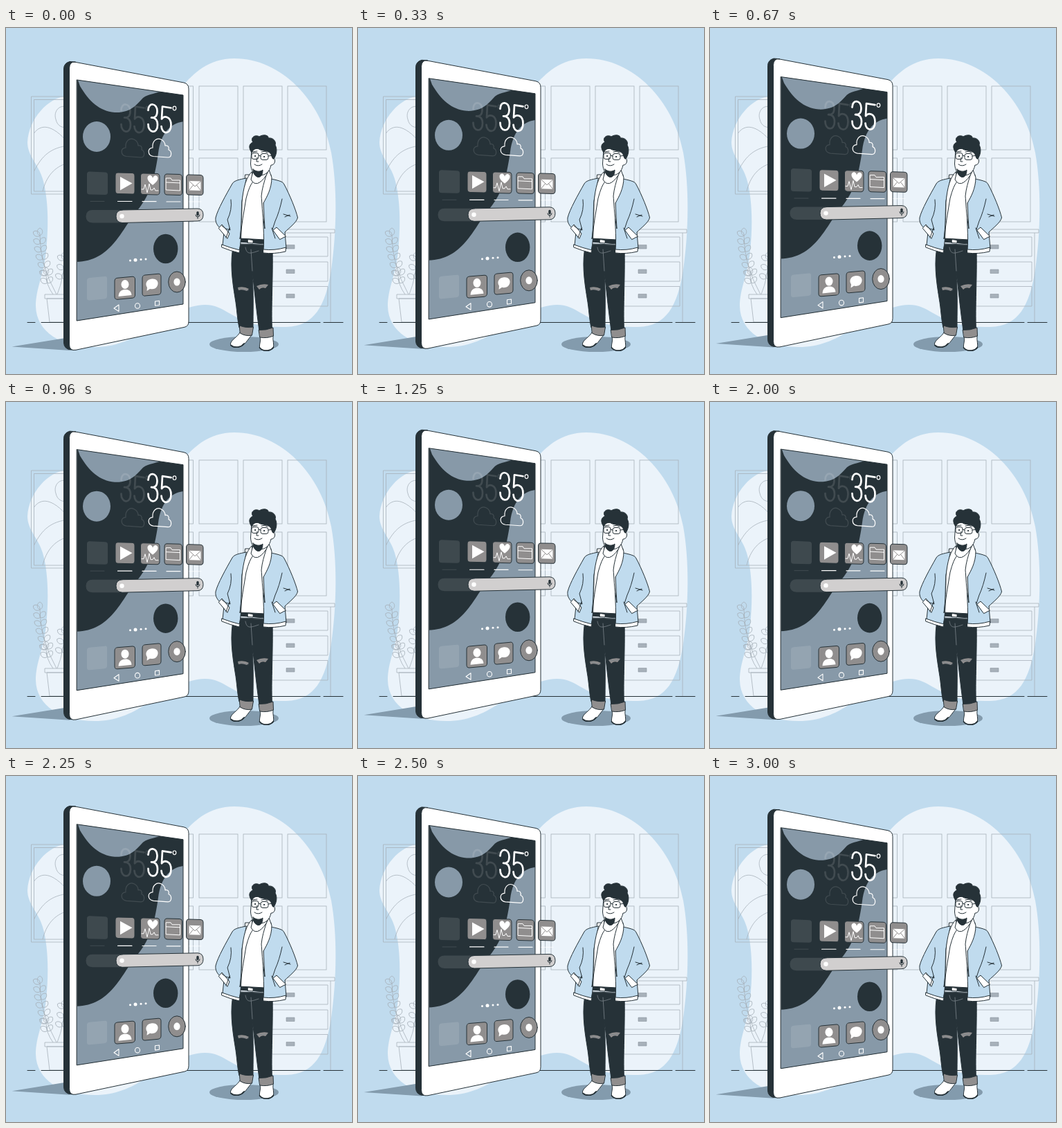
Write an HTML page that moves like this. It is 500 by 500 pixels and loops after 3.04 s.

```html
<!DOCTYPE html>
<html lang="en">
<head>
<meta charset="utf-8">
<title>Floating phone screen</title>
<style>
html, body { margin: 0; width: 100%; height: 100%; overflow: hidden; background: #c0dbee; }
svg { display: block; width: 100vw; height: 100vh; }
.ink { stroke: #263238; stroke-width: 1; stroke-linejoin: round; stroke-linecap: round; }
.pale { fill: none; stroke: #a7b1ba; stroke-width: .8; }
.line { fill: none; }
.white { fill: #fff; }
.dark { fill: #263238; }
.slate { fill: #8799a8; }
.gray { fill: #908e8e; }
.blue { fill: #c0dbee; }
.glow { fill: none; stroke: #fff; stroke-linecap: round; stroke-linejoin: round; }
</style>
</head>
<body>
<svg viewBox="0 0 500 500">
  <defs>
    <clipPath id="screen"><path d="M102.500 75L256 97V399L102.500 423Z"/></clipPath>
    <g id="weather" class="glow">
      <path stroke-width="2.700" d="M205.500 119C205.500 107 218.500 108 218.500 120C218.500 127 216 130 210 129.500C216 129.500 219 133 219 140C219 154 205 152 205.500 139M238.500 115.500L226 113.500L225 131.500C229 126 238.500 128 238.500 140C238.500 155 225 154 224.500 142"/>
      <ellipse cx="243.500" cy="116" rx="2.300" ry="2.800" stroke-width="1.200"/>
      <path stroke-width="1.200" d="M213 185.500C204 184 204 173 212 173C211 163 218 158 224 161C228 163 230 166 230 170C234 169 236 172 235 176C240 178 240 187 234 187Z"/>
    </g>
  </defs>

  <!-- room -->
  <path fill="#ebf3fa" d="M85 99C62 101 33 130 31 165C31 185 47 197 53 218C61 245 62 285 58 322C55 356 43 376 43 402C44 440 80 461 128 461C190 461 215 418 264 404C294 395 306 402 326 414C350 428 372 433 405 432C446 431 462 401 470 349C478 294 479 230 470 180C456 105 398 44 330 44C292 44 271 66 255 84C215 128 150 94 85 99Z"/>
  <g class="pale">
    <path d="M90 99H36.500V240H90M90 103.500H40.500V236H90M90 115C78 109 68 120 72 132C74 142 83 146 90 142M40.500 152C50 139 66 138 90 166M40.500 207C52 184 65 173 90 170M53 236C58 215 70 200 90 195"/>
    <g id="doors"></g>
    <path d="M350 291H475V296H350M469 296V425M372 302H465V330H372M372 338H465V366H372M372 373.500H465V402H372M375 296V425"/>
    <path fill="#ebf3fa" d="M56 385H90V391H56ZM59 391L63 425H90V391Z"/>
    <g id="plant"></g>
  </g>
  <path fill="#a7b1ba" stroke="#8c969e" stroke-width=".6" d="M405 313.500h12v5.500h-12ZM405 349h12v5.500h-12ZM405 384.500h12v5.500h-12Z"/>
  <path class="ink line" d="M31 425.500H42M51 425.500H454M459 425.500H487"/>

  <!-- phone -->
  <g id="phone">
    <path fill="#839bad" d="M8.500 460.500L92 447V466Z"/>
    <path class="ink dark" d="M100 49L92 48.500Q83.500 51 83.500 59V455Q84 463.500 93 465L101 465Z"/>
    <path class="ink white" d="M100 49.300L257 79Q264 80.500 264 88V424Q264 431 258 432.300L101 465.300Q91.500 467 91.500 457V58Q92 48 100 49.300Z"/>
    <g clip-path="url(#screen)">
      <path class="dark" d="M102 74H257V424H102Z"/>
      <path class="slate" d="M102 70L107 84C120 106 135 120 157 122C181 123 189 110 198 101C207 94 217 96 231 88V70ZM258 135C238 137 224 151 220 181C214 223 207 244 187 267C167 292 151 337 102 338V424H258Z"/>
      <ellipse class="slate" cx="131" cy="157" rx="20" ry="22"/>
      <ellipse class="dark" cx="230.700" cy="319" rx="17.700" ry="21.300"/>
    </g>
    <path class="ink line" d="M102.500 75L256 97V399L102.500 423Z"/>
    <use href="#weather" x="-39" opacity=".12"/>
    <use href="#weather"/>
    <g fill="#fff" opacity=".11">
      <path d="M121 207.500L143 208.500Q147 208.500 147 212V237.500Q147 241 143 241L121 240.500Q117 240.500 117 237V211Q117 207.500 121 207.500Z"/>
      <path d="M125 263H165V281.500H125Q115.500 281 115.500 272Q116 263 125 263Z"/>
      <path d="M121 361L143 359Q146 358.500 146 362V387.500Q146 391 142 391.500L121 393.500Q117 394 117 390V365Q117 361.500 121 361Z"/>
    </g>
    <g id="tiles"></g>

    <path class="white" d="M165 215V234.500L182.500 224.500Z"/>
    <path class="white" d="M212 227C204 221 203 216 206 213.500C209 211 212 215 212 217C213 213 217 212 219 215C221 219 217 223 212 227Z"/>
    <path class="glow" d="M196 233H199L201 226L204 238L207 225L209 234H212L214 231L216 235H220"/>
    <path class="glow" d="M231.500 217H238L240 220H251.500V235L231.500 234ZM231.500 223L251.500 224"/>
    <path class="white" d="M264.500 221L281.500 221.500V235L264.500 234.500Z"/>
    <path class="line" stroke="#908e8e" d="M264.500 221L273 229L281.500 221.500M264.500 234.500L270.500 227M281.500 235L275.500 227"/>
    <path class="glow" stroke-width="1.200" d="M161.500 250.500H182M197 250.700H217M232 251H252"/>
    <path class="glow" opacity=".7" d="M265 251H282"/>
    <path class="glow" opacity=".12" d="M122 250.500H142"/>

    <path class="ink" fill="#d1cfcf" d="M168 263L277 261Q285 261.500 285 270Q285 278.500 277 279L168 281.500Q159 281 159 272Q159 263.500 168 263Z"/>
    <circle class="white" cx="167.500" cy="272" r="3.200"/>
    <rect class="dark" x="275.300" y="265" width="3.400" height="6.500" rx="1.700"/>
    <path class="ink line" stroke-width=".8" d="M274 270Q274 273 277 273Q280 273 280 270M277 273V275.500"/>

    <g class="white">
      <circle cx="179.500" cy="336" r="1.500"/><circle cx="187" cy="335.200" r="2.500"/>
      <circle cx="195" cy="334.500" r="1.500"/><circle cx="202" cy="334" r="1.500"/>
      <ellipse cx="172" cy="370.500" rx="5.500" ry="6.500"/>
      <path d="M162.500 388C163 380 168 378 172 378C176 377.500 181 379 181.500 386Z"/>
      <path d="M203.500 380L204 375C200 369 204 363 211 362.500C218 362 221 367 219 372C217 377 212 378 208 377Z"/>
    </g>
    <ellipse class="ink gray" cx="247" cy="367" rx="12.300" ry="15"/>
    <ellipse class="white" cx="247" cy="367" rx="4.600" ry="5.500"/>
    <path class="glow" stroke-width="1.100" d="M156 405L163 400V409.500ZM215.500 395L221.500 394.200V400.500L215.500 401.300Z"/>
    <ellipse class="glow" stroke-width="1.100" cx="190" cy="401.500" rx="3.500" ry="3.800"/>
  </g>

  <!-- man -->
  <ellipse fill="#839bad" cx="344" cy="457" rx="50" ry="11"/>
  <g class="ink">
    <path class="white" d="M338 440C334 447 326 450 324.500 456C324 461 330 462 336 461C345 460 349 450 355 444ZM367 446C369 453 365 458 367 463C371 468 381 467 386 463C388 457 385 452 386 445Z"/>
    <path class="line" stroke-width="1.800" d="M325 458.500Q329 462 336 461Q341 460 344 456M366.500 462Q371 467 379 466Q384 465 386.500 461.500"/>
    <path class="dark" d="M329 312C323 338 327 365 331 390C334 407 334 420 337 433L357 434C357 411 358 386 356 352C359 380 362 409 366 438L384.500 437C383 400 386 366 385 314Z"/>
    <path class="gray" d="M337.500 430Q347 434 357.500 432L355.500 444Q346 446 338.500 441ZM365.500 436.500Q376 437 386 433L386.500 445Q377 449 367 447Z"/>
    <path class="gray" stroke="none" d="M335 375Q344 373 351 377L348 380Q341 377 336 379ZM362 373Q370 369 379 371L375 376Q369 374 366 378Z"/>
    <path class="line" stroke="#7c858b" stroke-width=".8" d="M346 317C348 328 353 326 365 322M354 320L356 351M336 376L350 379M364 374L377 373"/>
    <path class="white" d="M346 212L383 212L378 308L338 306Z"/>
    <path class="dark" d="M337 304L374 306V312L337 309Z"/>
    <path class="white" d="M349.500 305.500L357 306.500V311L349.500 310.500Z"/>

    <path class="blue" d="M347 217C338 219 330 220 327 225C318 241 306 262 303 274C302 281 306 287 311 290L315 295L313 314Q324 321 337 322C342 300 339 274 341 250Z"/>
    <path class="blue" d="M383 218C391 220 400 221 402 226C410 241 419 263 421.500 274C420 281 409 289 403 295L405 319Q388 325 372 321C374 301 370 275 372 251Z"/>
    <path class="white" d="M312 313Q325 318 338 321L337 325Q324 322 312 317ZM372 320Q388 322 404.500 317L404 323Q387 327 372 325Z"/>
    <path class="white" d="M307.500 289L312 284L323 297L320 304ZM386 292L391 288L404.500 301L396 305.500Z"/>
    <path class="line" d="M325 248Q327 263 320 277L324 292Q317 291 312 286M399 247Q395 266 389 279L385 291M401 269L411 272M403 273L410 270M318 303L323 289M384 289L389 304"/>
    <path class="white" d="M355 208C347 216 343 230 341 252C341 270 340 287 338 305Q342 274 347 246Q352 227 357 222ZM380 205L384 216C384 232 377 244 372 253L374 290C370 268 370 252 369 243C370 232 373 223 376 213Z"/>
    <path class="white" d="M357 207L354 219Q362 233 376 213L381 202Z"/>
    <path class="white" d="M355 175L353.500 196C354 205 358 214 366 213C375 213 381 208 383 198C388 199 391 190 386 187L385 174Z"/>
    <path class="dark" d="M357 204C361 208 368 208 371 205C371 211 369 216 364 215.500C359 214 357 209 357 204Z"/>
    <path class="dark" d="M355 180C350 173 351 167 357 165C352 159 360 153 366 157C372 153 380 155 379 159C386 158 391 164 389 169C393 176 390 185 387 189C385 191 384 184 382 181C377 176 368 178 364 174C360 174 357 176 355 180Z"/>
    <rect class="line" x="355" y="180.500" width="10" height="9" rx="3"/>
    <rect class="line" x="368" y="181.500" width="11" height="9" rx="3"/>
    <path class="line" d="M365 184L368 185M379 185L387 184M363 187L362 193H365M359 197Q364 201 370 197M356 179L363 178M369 179Q374 177 378 180"/>
    <circle class="dark" cx="360" cy="185" r=".7"/><circle class="dark" cx="373" cy="186" r=".7"/>
  </g>
</svg>
<script>
const $ = id => document.getElementById(id);

$("doors").innerHTML = [84, 188].map(y =>
  [215, 279, 343, 407].map(x =>
    `<rect x="${x}" y="${y}" width="${x < 279 ? 55.5 : 56}" height="92"/>`).join("")).join("");

// Rounded tile whose right side is shifted by `lean`
const tile = (x, y, w, h, lean) =>
  `<rect class="ink gray" width="${w}" height="${h}" rx="4" transform="matrix(1 ${lean / w} 0 1 ${x} ${y})"/>`;
$("tiles").innerHTML =
  tile(158, 209, 28, 30.5, .7) + tile(194.5, 210, 27.5, 30.5, .7) +
  tile(229, 211, 25.5, 30, .7) + tile(260.500, 212, 24.5, 29, .7) +
  tile(157, 361.5, 29.5, 31, -2.5) + tile(197, 357.5, 27, 30, -2.5);

const leaf = (x, y, turn) =>
  `<path transform="translate(${x} ${y}) rotate(${turn})" d="M0 0C2 -5 9 -5 11 0C9 5 2 5 0 0Z"/>`;
// Stem leaning along a parabola, with leaves in pairs
function stem(x, y, dx, height, pairs) {
  const at = p => [x + dx * p * (2 - p), y - height * p];
  let out = `<path d="M${x} ${y}Q${x + dx} ${y - height / 2} ${x + dx} ${y - height}"/>`;
  for (let i = 1; i <= pairs; i++) {
    const [a, b] = at(.2 + .8 * i / pairs);
    out += leaf(a, b, -150) + leaf(a, b, i === pairs ? -90 : -48);
  }
  return out;
}
$("plant").innerHTML = stem(73, 385, -24, 85, 6) + stem(68, 385, -10, 28, 2) + stem(74, 385, 10, 50, 3);

const LOOP = 3040, RISE = 10;
const start = performance.now();
function draw(now) {
  const phase = Math.max(0, now - start) % LOOP / LOOP;
  const lift = RISE * (1 - Math.abs(1 - 2 * phase));
  $("phone").setAttribute("transform", `translate(0 ${-lift})`);
  requestAnimationFrame(draw);
}
draw(start);
</script>
</body>
</html>
```
